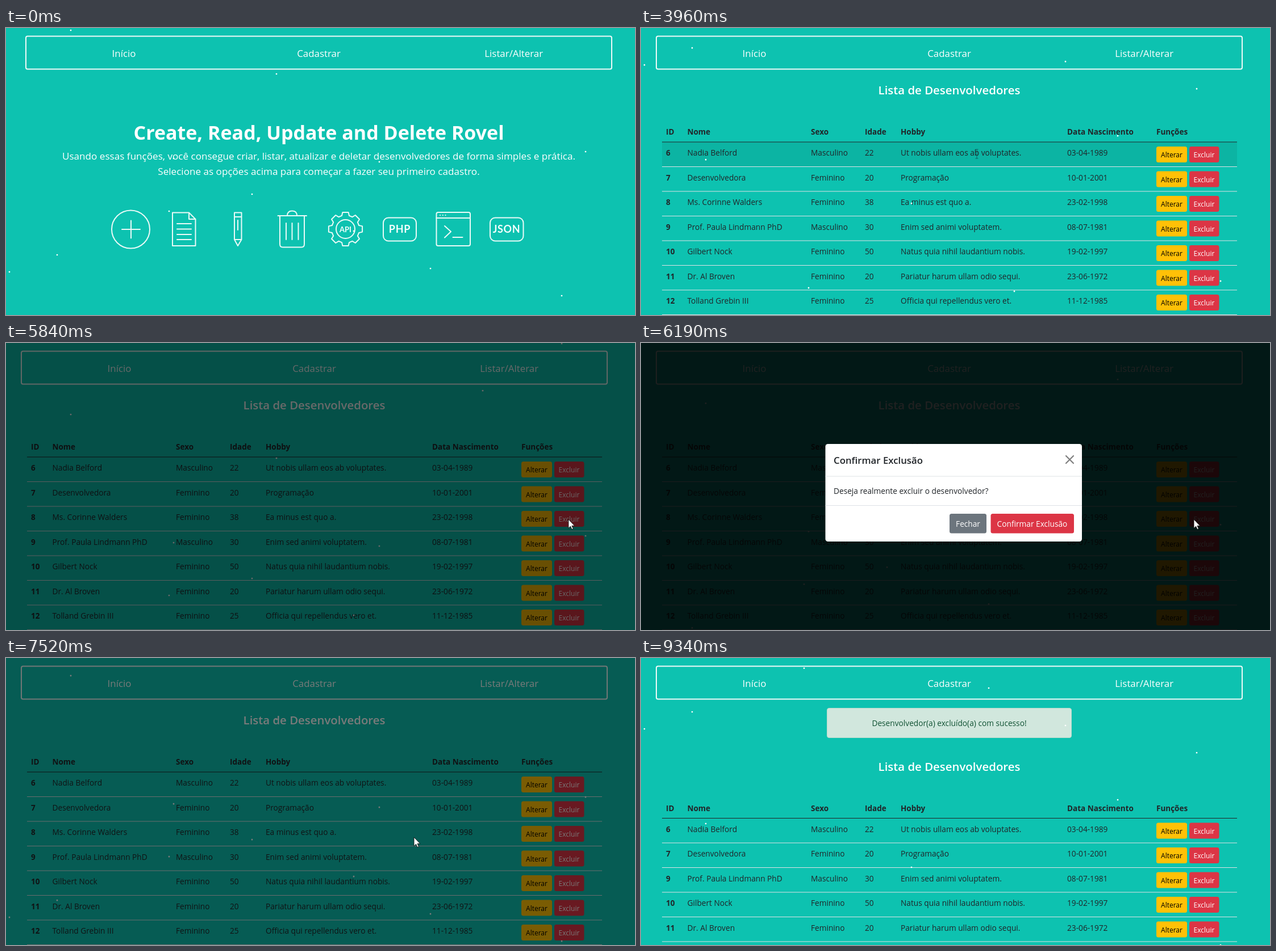
These frames come from a looping animation (1107x506 px, 9.41 s). An HTML page:

```html
<!DOCTYPE html>
<html lang="pt-BR">
<head>
<meta charset="utf-8">
<title>CRUD</title>
<style>
  html, body { margin: 0; width: 100%; height: 100%; overflow: hidden; background: #0dc2b0; }
  svg { display: block; width: 100%; height: 100%; font: 13.7px "Open Sans", "Noto Sans", sans-serif; }
  text { white-space: pre; }
  .nav { font-size: 16.9px; fill: #fff; text-anchor: middle; }
  .mid { text-anchor: middle; }
  .th { font-weight: 700; font-size: 13.5px; }
  .btn { font-size: 12px; text-anchor: middle; }
  .icons { fill: none; stroke: #e9faf7; stroke-width: 2; stroke-linecap: round; stroke-linejoin: round; }
  .icons text { fill: #f4fffd; stroke: none; font-family: Lato, sans-serif; font-weight: 700; text-anchor: middle; }
</style>
</head>
<body>
<svg id="stage" viewBox="0 0 1107 506"></svg>
<script>
const LOOP = 9410, LIST_AT = 1500, DONE_AT = 7940;
const SPEED = 0.05644, FIELD = 593, LOAD_SHIFT = 226;
const ROW = 43.5, TOP = 201, ALERT_SHIFT = 81.5;
const INK = '#212529';

const rows = [
  [6, 'Nadia Belford', 'Masculino', 22, 'Ut nobis ullam eos ab voluptates.', '03-04-1989'],
  [7, 'Desenvolvedora', 'Feminino', 20, 'Programação', '10-01-2001'],
  [8, 'Ms. Corinne Walders', 'Feminino', 38, 'Ea minus est quo a.', '23-02-1998'],
  [9, 'Prof. Paula Lindmann PhD', 'Masculino', 30, 'Enim sed animi voluptatem.', '08-07-1981'],
  [10, 'Gilbert Nock', 'Feminino', 50, 'Natus quia nihil laudantium nobis.', '19-02-1997'],
  [11, 'Dr. Al Broven', 'Feminino', 20, 'Pariatur harum ullam odio sequi.', '23-06-1972'],
  [12, 'Tolland Grebin III', 'Feminino', 25, 'Officia qui repellendus vero et.', '11-12-1985']
];
const columns = [44, 81.5, 299, 394, 457, 750, 907];
const heads = ['ID', 'Nome', 'Sexo', 'Idade', 'Hobby', 'Data Nascimento', 'Funções'];
const stars = [[114, 4], [476, 81], [1020, 218], [657, 236], [433, 293], [287, 323], [90, 400],
  [6, 430], [747, 424], [978, 472], [839, 555], [612, 358], [295, 230]];

// Cursor path: time, x, y
const path = [[350, 1062, 530], [1120, 893, 48], [1600, 888, 48], [2010, 859, 100], [2600, 830, 215],
  [3250, 428, 228], [3960, 591, 222], [4650, 907, 222], [5400, 991, 311], [5780, 991, 311],
  [6190, 973, 311], [6900, 690, 318], [7230, 690, 318], [7520, 718, 316], [8500, 1120, 340]];
const clicks = [[1360, 1500], [5640, 5790], [7080, 7210]];

const text = (x, y, s, attrs = '') => `<text x="${x}" y="${y}" ${attrs}>${s}</text>`;
const rect = (x, y, w, h, fill, r = 0, attrs = '') =>
  `<rect x="${x}" y="${y}" width="${w}" height="${h}" rx="${r}" fill="${fill}" ${attrs}/>`;
const line = (y, color, x1 = 37, x2 = 1049) =>
  `<path d="M${x1} ${y}H${x2}" stroke="${color}"/>`;

function table(data) {
  const body = data.map((row, i) => {
    const y = TOP + i * ROW;
    return row.map((v, c) => text(columns[c], y + 24, v, c ? '' : 'class="th"')).join('') +
      rect(907, y + 8, 54, 28, '#ffc107', 3.5) + text(934, y + 27, 'Alterar', 'class="btn" fill="#000"') +
      rect(965, y + 8, 52.5, 28, '#dc3545', 3.5) + text(991, y + 27, 'Excluir', 'class="btn" fill="#fff"') +
      line(y + ROW, '#dee2e6');
  }).join('');
  return text(542.5, 117, 'Lista de Desenvolvedores', 'class="mid" fill="#fff" font-size="20.4" font-weight="600"') +
    `<g fill="${INK}">` + heads.map((h, c) => text(columns[c], 188, h, 'class="th"')).join('') +
    line(TOP, INK) + body + '</g>';
}

function gear(cx, cy) {
  const points = [];
  for (let i = 0; i < 8; i++)
    for (const [da, r] of [[-.27, 24.5], [-.17, 30], [.17, 30], [.27, 24.5]]) {
      const a = i * Math.PI / 4 + da;
      points.push((cx + r * Math.sin(a)).toFixed(1) + ',' + (cy - r * Math.cos(a)).toFixed(1));
    }
  return `<polygon points="${points.join(' ')}"/><circle cx="${cx}" cy="${cy}" r="16.5"/>`;
}

const icons = `<g class="icons">
  <circle cx="219.5" cy="355" r="33.5"/><path d="M204 355H236M220 339.5V370.5"/>
  <path d="M293 325.5H322L333.5 337V384H293ZM322 325.5V337H333.5M301 345H326M301 354.5H326M301 364H326M301 373H326"/>
  <path d="M402 325.5H414.5V373L408 384L402 373ZM402 333H414.5M402 373H414.5M408 339V356"/>
  <path d="M478.5 331H529M495 331Q495 322.5 503.5 322.5Q512 322.5 512 331M482 331V381Q482 386.5 487 386.5H520Q525 386.5 525 381V331M493 344V373M503.5 344V373M514.5 344V373"/>
  ${gear(597.5, 354.5)}${text(597.5, 359.5, 'API', 'font-size="13"')}
  ${rect(664, 334.5, 58, 41, 'none', 9)}${text(693, 361, 'PHP', 'font-size="18" letter-spacing=".7"')}
  ${rect(757.5, 325, 59.5, 59, 'none', 3)}
  <path d="M757.5 335H817M764 330h.1M768.7 330h.1M773.4 330h.1M772 349L783 359L772 369.5M786.5 369H803.5"/>
  ${rect(852, 334.5, 58.5, 41, 'none', 9)}${text(881, 361, 'JSON', 'font-size="18" letter-spacing=".6"')}
</g>`;

const home = text(550.5, 197, 'Create, Read, Update and Delete Rovel',
    'class="mid" fill="#fff" font-size="34" font-weight="700"') +
  text(550.5, 232, 'Usando essas funções, você consegue criar, listar, atualizar e deletar desenvolvedores de forma simples e prática.',
    'class="mid" fill="#fff" font-size="17.1"') +
  text(550.5, 259, 'Selecione as opções acima para começar a fazer seu primeiro cadastro.',
    'class="mid" fill="#fff" font-size="17.1"') + icons;

const modal = rect(324.5, 178, 451.5, 172, '#fff', 4.5) +
  line(235, '#dee2e6', 324.5, 776) + line(286.5, '#dee2e6', 324.5, 776) +
  text(339, 212.5, 'Confirmar Exclusão', `font-size="16.8" font-weight="600" fill="${INK}"`) +
  '<path d="M748 199L761 212M761 199L748 212" stroke="#7f7f7f" stroke-width="2.2" stroke-linecap="round"/>' +
  text(339, 265.5, 'Deseja realmente excluir o desenvolvedor?', `fill="${INK}"`) +
  rect(543, 301, 65, 34.5, '#6c757d', 3.5) + text(575.5, 323.5, 'Fechar', 'class="mid" fill="#fff"') +
  rect(615.5, 301, 146.5, 34.5, '#dc3545', 3.5) + text(688.5, 323.5, 'Confirmar Exclusão', 'class="mid" fill="#fff"');

const alertBox = rect(327.5, 88.5, 430, 52, '#d1e7dd', 3.5, 'stroke="#badbcc"') +
  text(542.5, 120, 'Desenvolvedor(a) excluído(a) com sucesso!', 'class="mid" fill="#0f5132"');

const stage = document.getElementById('stage');
stage.innerHTML = rect(0, 0, 1107, 506, '#0dc2b0') +
  `<g id="nav">${rect(35, 14.5, 1031, 58, 'none', 3, 'stroke="#eefaf8" stroke-width="2"')}
    ${text(207.5, 50.5, 'Início', 'class="nav"')}${text(550.5, 50.5, 'Cadastrar', 'class="nav"')}
    <g id="link">${text(0, 6, 'Listar/Alterar', 'class="nav"')}</g></g>
  ${rect(37, 0, 1012, ROW, 'rgba(0,0,0,.075)', 0, 'id="hover"')}
  <g id="home">${home}</g>
  <g id="list">${table(rows)}</g>
  <g id="done">${alertBox}<g transform="translate(0 ${ALERT_SHIFT})">${table(rows.filter(r => r[0] !== 8))}</g></g>
  ${rect(0, 0, 54, 28, 'rgba(0,0,0,.15)', 3.5, 'id="press"')}
  <g id="stars">${stars.map(([x]) => rect(x - 1.3, 0, 2.6, 2.6, '#fff', .9)).join('')}</g>
  ${rect(0, 0, 1107, 506, '#000', 0, 'id="shade"')}
  <g id="modal">${modal}</g>
  <g id="cursor">
    <circle id="ring" r="11" fill="#e09a26" opacity=".85"/>
    <path id="arrow" d="M0 0V15.5L3.6 12.2L6 17.6L8.4 16.6L6 11.3H10.8Z" fill="#fff" stroke="#111" stroke-width=".9"/>
    <path id="hand" d="M-1.5 1.5Q0 -.8 1.5 1.5V8Q3 6.5 4.5 8Q6 7 7.5 8.7Q10 8 10 10.5V15Q10 17 8.3 19V21H-.5V19L-5 12.5Q-5.5 10 -3 10.5L-1.5 12Z" fill="#fff" stroke="#111" stroke-width=".9"/>
    <path id="beam" d="M-2.5 -8H2.5M0 -8V8M-2.5 8H2.5" fill="none" stroke="#123" stroke-width=".9" opacity=".6"/>
  </g>`;

const el = {};
stage.querySelectorAll('[id]').forEach(n => el[n.id] = n);
const show = (node, on) => { node.style.display = on ? '' : 'none'; };
const move = (node, x, y, extra = '') => node.setAttribute('transform', `translate(${x} ${y}) ${extra}`);

const smooth = k => k * k * (3 - 2 * k);
const easeOut = k => 1 - (1 - k) ** 3;
// Values between keys [time, ...values]
function at(t, keys, ease = k => k) {
  const i = keys.findIndex(k => k[0] > t);
  if (i < 0) return keys[keys.length - 1].slice(1);
  if (!i) return keys[0].slice(1);
  const a = keys[i - 1], b = keys[i], k = ease((t - a[0]) / (b[0] - a[0]));
  return a.slice(1).map((v, j) => v + (b[j + 1] - v) * k);
}

function render(t) {
  const isHome = t < LIST_AT, isDone = t >= DONE_AT;
  show(el.home, isHome);
  show(el.list, !isHome && !isDone);
  show(el.done, isDone);
  move(el.nav, isHome ? 0 : -8, 0);
  const [scale] = at(t, [[1030, 1], [1230, 1.2], [1970, 1.2], [2010, 1.165], [2180, 1]]);
  move(el.link, 893.7, 44.5, `scale(${scale})`);

  // Each page load restarts the drifting stars
  const drift = isHome ? t * SPEED : LOAD_SHIFT + (t - (isDone ? DONE_AT : LIST_AT)) * SPEED;
  stars.forEach(([, y], i) => {
    const p = ((y - drift) % FIELD + FIELD) % FIELD;
    el.stars.children[i].setAttribute('y', (p - 1.3).toFixed(2));
  });

  const [shade] = at(t, [[5740, 0], [5890, .875], [7470, .875], [7520, .53], [7600, 0]]);
  const [solid] = at(t, [[5890, 0], [6040, 1], [7200, 1], [7350, 0]]);
  const [drop] = at(t, [[5890, -45], [6170, 0], [7200, 0], [7500, -45]], easeOut);
  el.shade.setAttribute('opacity', shade);
  el.modal.setAttribute('opacity', solid);
  move(el.modal, 0, drop);

  const [x, y] = at(t, path, smooth);
  const top = TOP + (isDone ? ALERT_SHIFT : 0);
  const row = Math.floor((y - top) / ROW), rowY = top + row * ROW;
  const inRow = !isHome && shade === 0 && row >= 0 && x > 37 && x < 1049;
  show(el.hover, inRow);
  el.hover.setAttribute('y', rowY);

  const inButton = inRow && y > rowY + 8 && y < rowY + 36 && (x >= 907 && x < 961 || x > 965 && x < 1017);
  show(el.press, inButton && x > 965);
  move(el.press, 964.5, rowY + 8);

  const inLink = y < 72 && x > 722;
  const inConfirm = solid > .5 && x > 616 && x < 762 && y > 301 && y < 335;
  const hand = inButton || inLink || inConfirm;
  const beam = !hand && inRow && x < 825 && Math.abs(y - rowY - 20) < 9;
  move(el.cursor, x, y);
  show(el.hand, hand);
  show(el.beam, beam);
  show(el.arrow, !hand && !beam);
  show(el.ring, clicks.some(([a, b]) => t >= a && t < b));
}

const start = performance.now();
function tick() {
  render((performance.now() - start) % LOOP);
  requestAnimationFrame(tick);
}
tick();
</script>
</body>
</html>
```
